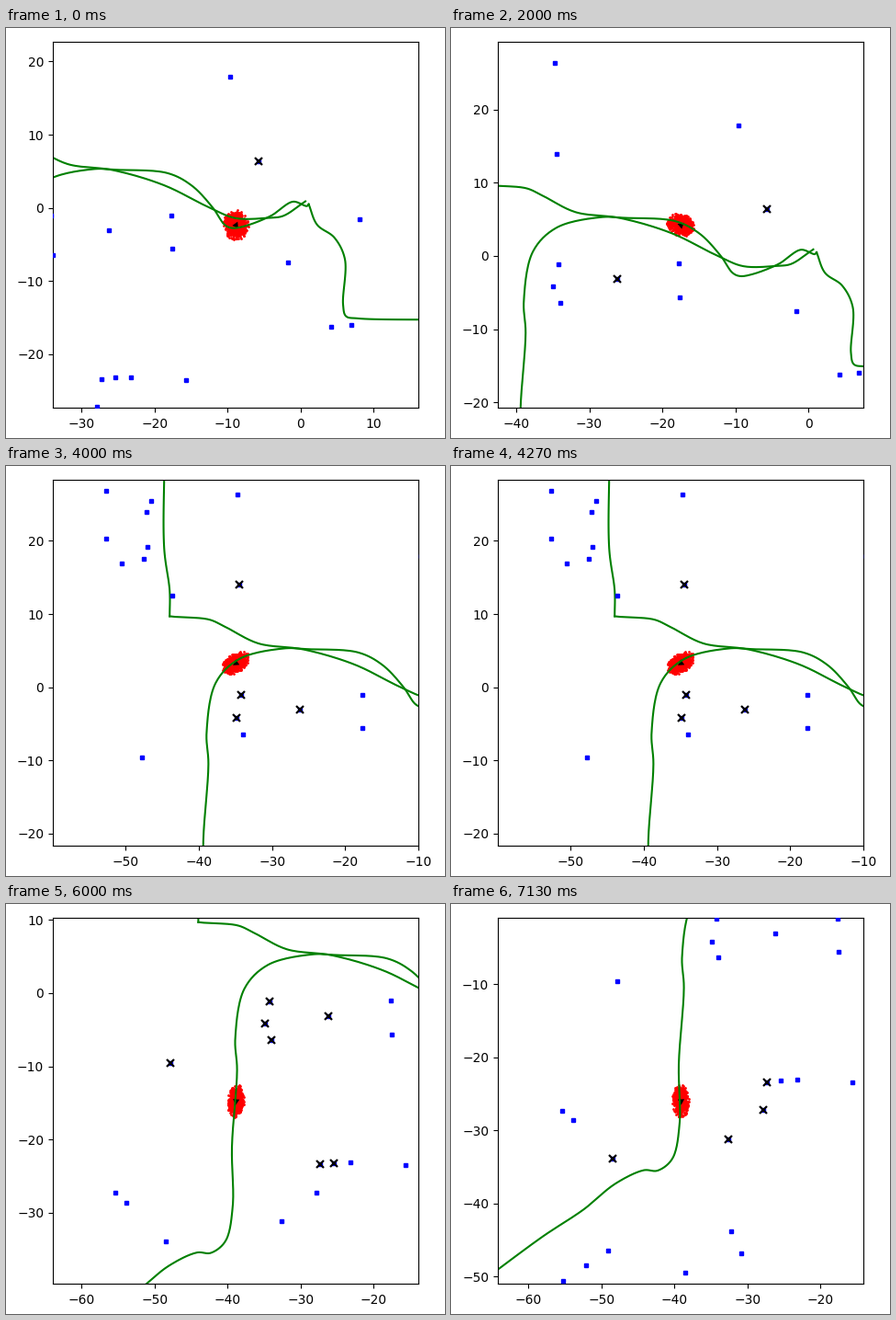
Recreate the animation shown at these times as a matplotlib script. Size 478 by 446 pixels, loop 7990 ms.

```python
import matplotlib.pyplot as plt
import numpy as np
from matplotlib.animation import FuncAnimation
from matplotlib.ticker import MultipleLocator

W, H, DPI = 478, 446, 100
LOOP_MS = 7990
HALF = 25  # half width of the view, in map units


def smooth(points, steps=16):
    """Centripetal Catmull-Rom curve through the points."""
    p = np.array(points, float)
    p = np.vstack([2 * p[0] - p[1], p, 2 * p[-1] - p[-2]])
    u = np.linspace(0, 1, steps, endpoint=False)[:, None]
    parts = []
    for a, b, c, d in zip(p, p[1:], p[2:], p[3:]):
        t1, t2, t3 = np.cumsum([np.sqrt(np.hypot(*s))
                                for s in (b - a, c - b, d - c)])
        t = t1 + u * (t2 - t1)
        ab = a + (b - a) * t / t1
        bc = b + (c - b) * (t - t1) / (t2 - t1)
        cd = c + (d - c) * (t - t2) / (t3 - t2)
        abc = ab + (bc - ab) * t / t2
        bcd = bc + (cd - bc) * (t - t1) / (t3 - t1)
        parts.append(abc + (bcd - abc) * (t - t1) / (t2 - t1))
    return np.vstack(parts + [p[-2:-1]])


def row(start, end, n=3):
    return np.linspace(start, end, n)


# Key points of the route, split at its sharp corners
east = smooth([(20, -15.3), (7.8, -15.1), (6.2, -14.8), (5.8, -13.2),
               (6.05, -7), (4.6, -4.05), (2.25, -2.3), (1.1, 0.5)])
outbound = smooth([(1.1, 0.5), (0.85, 0.25), (-1.05, 0.85), (-4.1, -1.1),
                   (-7.7, -2.5), (-9.4, -2.75), (-10.4, -2.3), (-12, 0),
                   (-14.9, 3.05), (-18.2, 4.75), (-25, 5.2), (-28.4, 5.3),
                   (-34.5, 3.85), (-37.7, 0.6), (-38.95, -6.2),
                   (-38.7, -10.5), (-39.4, -21), (-39.3, -29.2),
                   (-40.3, -33.9), (-42.3, -35.5), (-44.2, -35.45),
                   (-48.1, -37.3), (-52.4, -40.8), (-58, -44.5),
                   (-66, -50.4)])
back = smooth([(0.65, 0.9), (-2.4, -1.1), (-4.3, -1.35), (-8.9, -1.4),
               (-12.4, 0), (-18.7, 3.1), (-25.6, 5.15), (-31.9, 6),
               (-36.3, 8.2), (-38.6, 9.25), (-43, 9.6), (-44, 9.7)])
north = smooth([(-44, 9.7), (-44, 13.2), (-44.75, 19), (-44.7, 32)])

# Landmarks that get observed: x, y, first and last step of observation
TRACKED = np.array([
    (-5.7, 6.4, 0, 2), (-26.2, -3.1, 2, 6), (-34.5, 14, 3, 4),
    (-34.2, -1.1, 3, 6), (-34.9, -4.2, 3, 6), (-33.95, -6.4, 6, 6),
    (-47.8, -9.6, 6, 6), (-25.4, -23.2, 6, 6), (-27.3, -23.4, 6, 7),
    (-27.9, -27.2, 7, 7), (-48.5, -33.9, 7, 7), (-32.6, -31.2, 7, 7)])
OTHERS = np.vstack([
    row((-17.7, -1.05), (-17.6, -5.6), 2), row((4.2, -16.2), (6.9, -16), 2),
    row((-52.7, 26.8), (-52.7, 20.3), 2), row((-55.2, -50.6), (-49.1, -46.4)),
    (-9.6, 17.9), (8.1, -1.6), (-1.7, -7.5), (-23.2, -23.1), (-15.7, -23.5),
    (-34.7, 26.4), (-46.5, 25.4), (-47.2, 24), (-47, 19.2), (-47.6, 17.5),
    (-50.5, 16.9), (-43.6, 12.5), (-55.3, -27.3), (-53.9, -28.6),
    (-32.2, -43.8), (-30.8, -46.8), (-38.5, -49.4)])

# Estimated robot position, one per step
CENTRES = [(-8.9, -2.3), (-12.5, 0.6), (-17.5, 4.27), (-26.15, 5),
           (-34.98, 3.35), (-38.5, -4.2), (-38.9, -14.7), (-39.15, -25.95)]


def heading(centre):
    """Direction of the route where it passes the centre, in radians."""
    k = np.argmin(np.hypot(*(outbound[:-1] - centre).T))
    dx, dy = outbound[k + 1] - outbound[k]
    return np.arctan2(dy, dx)


def cloud(i, angle):
    """Particles that narrow across the heading as the steps go on."""
    z = np.random.default_rng(i).normal(size=(800, 2))
    z = z[np.hypot(*z.T) < 2.5] * (0.72 + 0.03 * i, 0.44 + 0.4 * 0.65 ** i)
    c, s = np.cos(angle), np.sin(angle)
    return CENTRES[i] + z @ np.array([(c, s), (-s, c)])


fig = plt.figure(figsize=(W / DPI, H / DPI), dpi=DPI, facecolor="white")
ax = fig.add_axes([51 / W, 33 / H, 398 / W, 398 / H])
ax.tick_params(labelsize=10)
ax.tick_params(axis="x", pad=4.2)
for axis in (ax.xaxis, ax.yaxis):
    axis.set_major_locator(MultipleLocator(10))

particles = ax.scatter([], [], s=4, c="red", linewidths=0, zorder=1)
robot, = ax.plot([], [], color="black", ms=6, mew=0, ls="none", zorder=1.5)
for piece in (east, outbound, back, north):
    ax.plot(*piece.T, color="green", lw=1.5, zorder=2)
ax.plot(*np.vstack([TRACKED[:, :2], OTHERS]).T, "s", color="blue", ms=3,
        mew=1, zorder=3)
seen, = ax.plot([], [], "x", color="black", ms=6, mew=1.6, zorder=4)


def draw(i):
    x, y = CENTRES[i]
    angle = heading((x, y))
    ax.set_xlim(x - HALF, x + HALF)
    ax.set_ylim(y - HALF, y + HALF)
    particles.set_offsets(cloud(i, angle))
    robot.set_data([x], [y])
    robot.set_marker((3, 0, np.degrees(angle) - 90))
    px, py, first, last = TRACKED.T
    now = (first <= i) & (i <= last)
    seen.set_data(px[now], py[now])
    return particles, robot, seen


anim = FuncAnimation(fig, draw, frames=len(CENTRES),
                     interval=LOOP_MS / len(CENTRES), repeat=True, blit=False)
plt.show()
```
